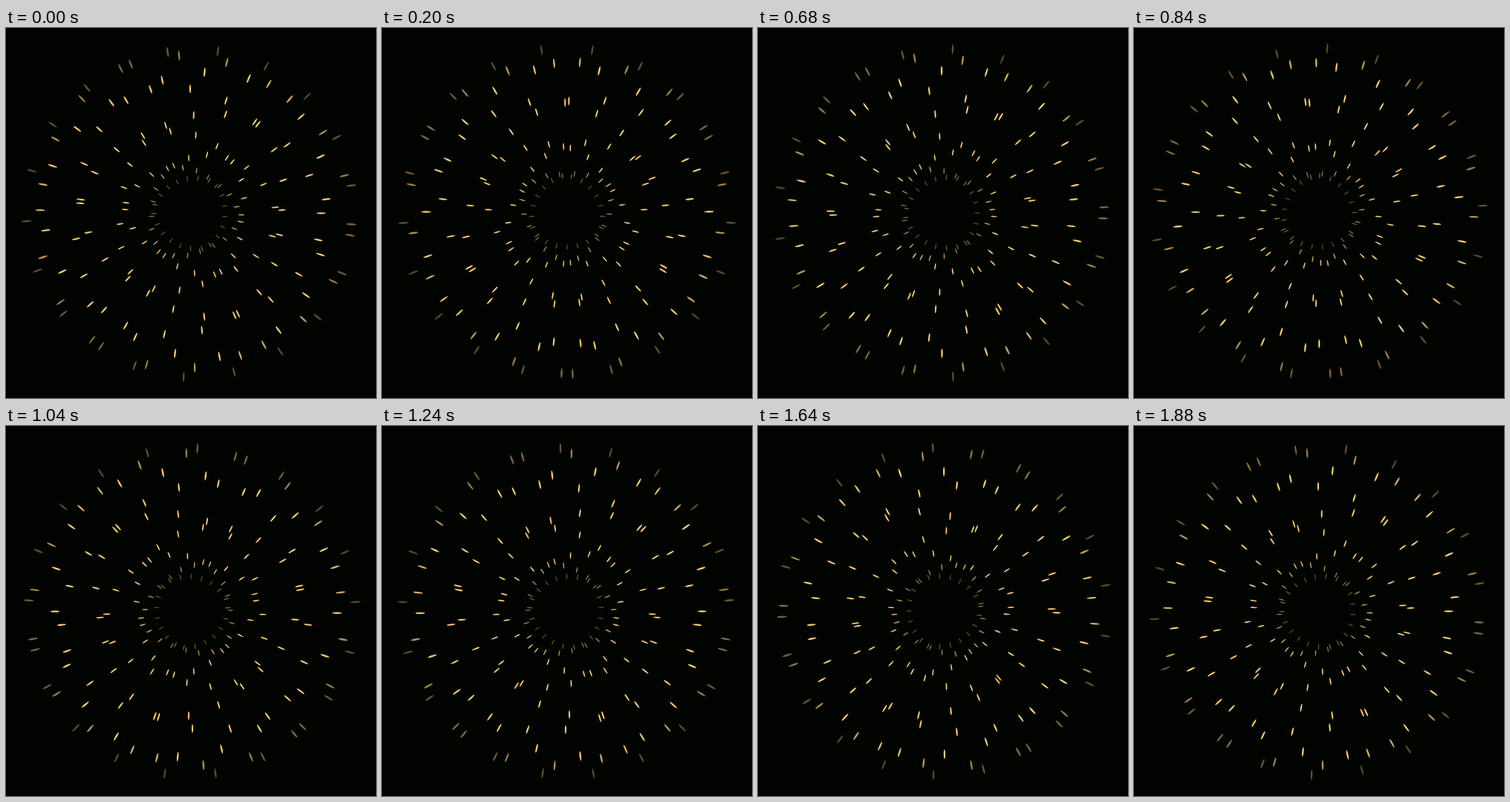
An HTML page with a canvas that plays this animation: 500x500 px, repeating every 1.92 s.

```html
<!DOCTYPE html>
<html lang="en">
<head>
<meta charset="utf-8">
<title>Coil of sparks</title>
<style>
  html, body { margin: 0; width: 100%; height: 100%; overflow: hidden; background: #010300; }
  canvas { display: block; width: 500px; height: 500px; }
</style>
</head>
<body>
<canvas id="stage" width="500" height="500"></canvas>
<script>
const ctx = document.getElementById('stage').getContext('2d');
const RAD = Math.PI / 180;
const LOOP = 1920, STEP = 40;

const COUNT = 183;              // three coils of 61 sparks
const TURN = 360 / COUNT;       // angle between neighbouring sparks
const SHIFT = -27 * 360 / 61;   // phase between neighbouring sparks
const ANGLE0 = -62.85, PHASE0 = -2.95;
const SPIN = -0.125, FLOW = 2.5; // degrees per step
const MID = 134.4, SWING = 88.3;

function spark(angle, phase) {
  const r = MID + SWING * Math.cos(phase);
  const half = 3.2 + 0.0165 * r;
  ctx.save();
  ctx.rotate(angle);
  ctx.globalAlpha = Math.min(1, 0.34 + 1.3 * Math.sin(phase) ** 2);
  ctx.beginPath();
  ctx.ellipse(r, 0, half, half * 0.185, 0, 0, 2 * Math.PI);
  ctx.fill();
  ctx.restore();
}

function draw(step) {
  ctx.fillStyle = '#010300';
  ctx.fillRect(0, 0, 500, 500);
  ctx.fillStyle = '#ffd06c';
  ctx.save();
  ctx.translate(250, 250);
  for (let i = 0; i < COUNT; i++) {
    spark((ANGLE0 + i * TURN + step * SPIN) * RAD,
          (PHASE0 + i * SHIFT + step * FLOW) * RAD);
  }
  ctx.restore();
}

let start = null;
function tick(now) {
  if (start === null) start = now;
  draw(Math.floor(((now - start) % LOOP) / STEP));
  requestAnimationFrame(tick);
}
draw(0);
requestAnimationFrame(tick);
</script>
</body>
</html>
```
